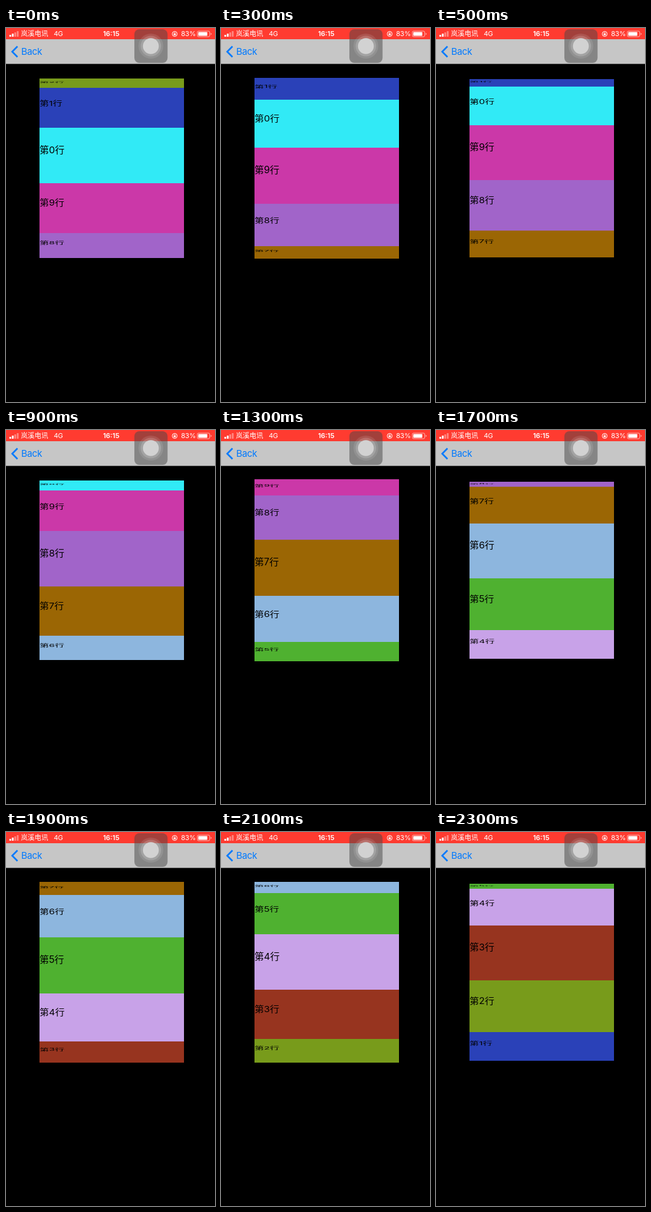
An HTML page for the animation above (2400 ms loop, 337 px wide and 600 px high).

```html
<!DOCTYPE html>
<html lang="zh">
<head>
<meta charset="utf-8">
<title>Row drum</title>
<style>
  html, body { margin: 0; width: 100%; height: 100%; overflow: hidden; background: #000; }
  #stage {
    position: relative; width: 337px; height: 600px; overflow: hidden; background: #000;
    font-family: Inter, "Noto Sans CJK SC", "Noto Sans CJK", sans-serif;
  }
  svg { position: absolute; left: 0; top: 0; }
  .row {
    position: absolute; left: 54px; top: 0; width: 233px; height: 90px;
    transform-origin: 0 0; color: #000; font-size: 15.3px; line-height: 72px; white-space: nowrap;
  }
</style>
</head>
<body>
<div id="stage">
  <svg width="337" height="60" viewBox="0 0 337 60">
    <rect width="337" height="18" fill="#ff3b30"/>
    <rect y="18" width="337" height="39.6" fill="#c6c6c6"/>

    <g fill="#fff" font-size="11">
      <rect x="5.5" y="11" width="2.8" height="3" rx=".6"/>
      <rect x="9.5" y="9" width="2.8" height="5" rx=".6"/>
      <g opacity=".4">
        <rect x="13.5" y="7" width="2.8" height="7" rx=".6"/>
        <rect x="17.5" y="5" width="2.8" height="9" rx=".6"/>
      </g>
      <text x="24" y="13.3">岚溪电讯</text>
      <text x="77" y="13.3" letter-spacing="-.3">4G</text>
      <text x="169.7" y="13.3" font-weight="600" text-anchor="middle">16:15</text>
      <text x="306" y="13.3" text-anchor="end" letter-spacing="-.2">83%</text>
      <circle cx="272" cy="9.5" r="4" fill="none" stroke="#fff" stroke-width="1"/>
      <rect x="270.3" y="9" width="3.4" height="2.6"/>
      <path d="M271 9V8.2a1 1 0 0 1 2 0V9" fill="none" stroke="#fff" stroke-width=".7"/>
      <rect x="308.5" y="5" width="20" height="9" rx="2" fill="none" stroke="#fff" stroke-opacity=".6"/>
      <rect x="310" y="6.5" width="14.5" height="6" rx=".8"/>
      <path d="M330 8v3q1.4-.4 1.4-1.5T330 8" opacity=".6"/>
    </g>

    <path d="M18.5 29.5 10 38l8.500 8.500" fill="none" stroke="#007aff" stroke-width="2.6"/>
    <text x="24.600" y="43.400" fill="#007aff" font-size="15" letter-spacing="-.4">Back</text>

    <rect x="207" y="2" width="53.500" height="54" rx="8" fill="#464646" fill-opacity=".5"/>
    <g transform="translate(233.600 29)">
      <circle r="20" fill="#fff" fill-opacity=".1"/>
      <circle r="16.500" fill="#fff" fill-opacity=".16"/>
      <circle r="12.800" fill="#d2d2d2"/>
    </g>
  </svg>
</div>

<script>
const LOOP = 2400, STEP = 100;
const CENTER = 225, RADIUS = 145.6, ROW_HEIGHT = 90, ROW_ANGLE = 36;
const colors = ['#31eaf6', '#2a41b8', '#789b1b', '#97341f', '#c8a2e8',
                '#4fb130', '#8db6de', '#9b6604', '#a164c9', '#cb38a8'];

// Drum rotation: [time in ms, degrees]
const turns = [[0, 9.5], [500, -28.4], [900, -61.7], [1300, -91.7],
               [1500, -115.4], [1900, -166.5], [2300, -247]];

const stage = document.getElementById('stage');
const rows = colors.map((color, i) => {
  const row = document.createElement('div');
  row.className = 'row';
  row.style.background = color;
  row.textContent = `第${i}行`;
  return stage.appendChild(row);
});

function slope(i) {
  const a = turns[Math.max(i - 1, 0)];
  const b = turns[Math.min(i + 1, turns.length - 1)];
  return (b[1] - a[1]) / (b[0] - a[0]);
}

// Smooth cubic through the listed rotations
function turnAt(time) {
  let i = 0;
  while (i < turns.length - 2 && time >= turns[i + 1][0]) i++;
  const [t0, a0] = turns[i], [t1, a1] = turns[i + 1];
  const span = t1 - t0, u = (time - t0) / span, v = 1 - u;
  return a0 * v * v * (1 + 2 * u) + a1 * u * u * (3 - 2 * u)
    + span * u * v * (slope(i) * v - slope(i + 1) * u);
}

const edgeY = deg => Math.round(CENTER + RADIUS * Math.sin(deg * Math.PI / 180));

function draw(now) {
  const turn = turnAt(Math.floor(now % LOOP / STEP) * STEP);
  rows.forEach((row, i) => {
    const angle = turn + ROW_ANGLE * (9 - i);
    const top = edgeY(angle), height = edgeY(angle + ROW_ANGLE) - top;
    row.style.display = height > 0 ? 'block' : 'none';
    row.style.transform = `translateY(${top}px) scaleY(${height / ROW_HEIGHT})`;
  });
}

const start = performance.now();
function tick() {
  draw(performance.now() - start);
  requestAnimationFrame(tick);
}
tick();
</script>
</body>
</html>
```
